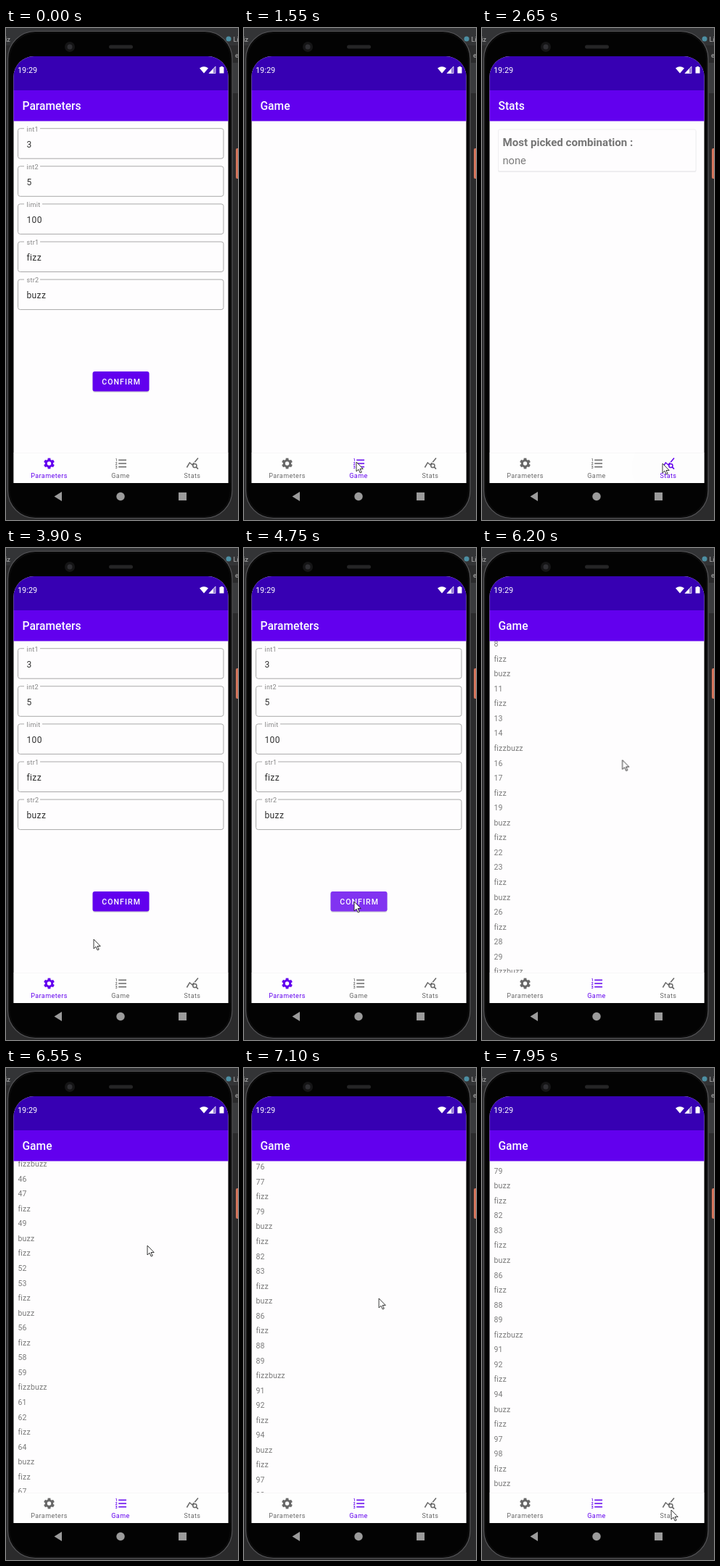
These frames come from a looping animation (320x679 px, 8000 ms). An HTML page:

```html
<!DOCTYPE html>
<html lang="en">
<head>
<meta charset="utf-8">
<title>FizzBuzz app demo</title>
<style>
  html, body { margin: 0; width: 100%; height: 100%; overflow: hidden; background: #2b2b2c; }
  svg { display: block; width: 100%; height: 100%; font-family: Roboto, sans-serif; }
  .title { font-size: 15.6px; font-weight: 500; fill: #fff; }
  .label { font-size: 9px; letter-spacing: .3px; fill: #858585; }
  .value { font-size: 12px; letter-spacing: .38px; fill: #303030; }
  .row { font-size: 10.5px; letter-spacing: .19px; fill: #7a7a7a; }
  .tab { color: #686868; }
  .tab text { font-size: 9px; letter-spacing: .42px; text-anchor: middle; fill: currentColor; }
  .line { fill: none; stroke: currentColor; }
</style>
</head>
<body>
<svg viewBox="0 0 320 679">
  <defs>
    <clipPath id="screen"><path d="M10.5 628V67A28 28 0 0 1 38.5 39H278.5A28 28 0 0 1 306.5 67V628Z"/></clipPath>
    <clipPath id="content"><rect x="10.5" y="128" width="296" height="458"/></clipPath>
    <clipPath id="bar"><rect x="10.5" y="586" width="296" height="42"/></clipPath>
    <clipPath id="pill"><rect x="119.5" y="474" width="78" height="27.5" rx="3"/></clipPath>
  </defs>

  <!-- desktop behind the phone -->
  <rect width="320" height="679" fill="#2b2b2c"/>
  <rect width="320" height="24" fill="#333436"/>
  <rect x="313" y="48" width="7" height="42" fill="#3a3b3d"/>
  <g font-size="9.500" fill="#b4b4b4">
    <text x="-1" y="19">iz</text><text x="313.500" y="19">Li</text><text x="316" y="41">e</text>
  </g>
  <circle cx="307" cy="15" r="3.5" fill="#4d8fa3"/>
  <rect x="317" y="166" width="6" height="42" rx="2" fill="#d5755c"/>

  <!-- phone body -->
  <rect x="2.500" y="4.500" width="309.500" height="672" rx="38" fill="#0b0b0b" stroke="#555558" stroke-width="1.200"/>
  <rect x="5.500" y="7.500" width="303.500" height="666" rx="35" fill="#030303"/>
  <circle cx="88" cy="26" r="7" fill="#151516"/><circle cx="88" cy="26" r="3.5" fill="#303034"/>
  <rect x="142" y="23.5" width="33" height="5" rx="2.5" fill="#252526"/>

  <g clip-path="url(#screen)">
    <rect x="10" y="39" width="297" height="589" fill="#fefdfe"/>
    <g id="pages" clip-path="url(#content)"></g>
    <rect x="10" y="39" width="297" height="47" fill="#3700b3"/>
    <rect x="10" y="86" width="297" height="42.5" fill="#6200ee"/>
    <g id="titles"></g>
    <g fill="#fff">
      <text x="16" y="62" font-size="10.900">19:29</text>
      <path d="M267 55.5Q273 51 279 55.5L273 62.5Z"/>
      <path d="M289 53V62.500H280Z" fill-opacity=".45"/><path d="M286 56.200V62.500H280Z"/>
      <path d="M289 53V62.500H280Z" fill="none" stroke="#fff" stroke-width=".7"/>
      <path d="M294.500 54H296V53H299V54H300.500V62.500H294.500Z"/>
    </g>
    <g clip-path="url(#bar)">
      <rect x="10" y="586" width="297" height="42" fill="#fefefe"/>
      <path d="M10 586H307" stroke="#f1f0f2"/>
      <g id="ripples"></g>
      <g id="tabs"></g>
    </g>
  </g>

  <g fill="#9b9b9b">
    <path d="M66.500 646.500L77 640V653Z"/><circle cx="158" cy="646.500" r="5.700"/>
    <rect x="238" y="641" width="11" height="11"/>
  </g>
  <path id="cursor" d="M0 0V13L3 10.200L5.200 15L7.200 14.100L5 9.500H9.200Z" fill="#fff" stroke="#222" stroke-width=".9"/>
</svg>

<script>
const LOOP = 8000;
const $ = id => document.getElementById(id);

// steps: [ms, value, easing towards the next step]
function track(el, prop, steps) {
  const first = steps[0], last = steps[steps.length - 1];
  const all = [...steps];
  if (first[0] > 0) all.unshift([0, first[1]]);
  if (last[0] < LOOP) all.push([LOOP, last[1]]);
  const frames = all.map(([ms, value, easing = 'linear']) =>
    ({ offset: ms / LOOP, [prop]: value, easing }));
  el.animate(frames, { duration: LOOP, iterations: Infinity });
}

const hold = (el, prop, steps) =>
  track(el, prop, steps.map(([ms, value]) => [ms, value, 'step-end']));

// Pages
const fields = [['int1', '3', 22], ['int2', '5', 22], ['limit', '100', 25], ['str1', 'fizz', 22], ['str2', 'buzz', 22]];
const fieldMarkup = ([label, value, gap], i) => `
  <g transform="translate(0 ${i * 52.1})">
    <rect x="16.500" y="138.700" width="283.500" height="41.500" rx="3" fill="none" stroke="#a9a9a9"/>
    <rect x="25" y="137" width="${gap}" height="4" fill="#fefdfe"/>
    <text class="label" x="28.500" y="142.800">${label}</text>
    <text class="value" x="28.500" y="164.500">${value}</text>
  </g>`;

const word = n => (n % 3 ? '' : 'fizz') + (n % 5 ? '' : 'buzz') || n;
const ROW = 20.56;
const rows = Array.from({ length: 100 }, (_, i) =>
  `<text class="row" x="16.500" y="${(145.6 + i * ROW).toFixed(2)}">${word(i + 1)}</text>`).join('');

$('pages').innerHTML = `
  <g id="list"><g id="rows">${rows}</g></g>
  <g id="stats">
    <rect x="22" y="141" width="273.500" height="58" rx="2" fill="#ececee"/>
    <rect x="22.500" y="140" width="272.500" height="57.500" rx="2" fill="#fefdfe" stroke="#f0eff1"/>
    <text x="28.500" y="162.700" font-size="15.100" font-weight="700" fill="#757575">Most picked combination :</text>
    <text x="28.500" y="187.700" font-size="14.700" fill="#7c7c7c">none</text>
  </g>
  <g id="params">
    ${fields.map(fieldMarkup).join('')}
    <rect x="119.500" y="475" width="78" height="28" rx="3" fill="#000" opacity=".14"/>
    <rect x="119.500" y="474" width="78" height="27.500" rx="3" fill="#6200ee"/>
    <circle id="press" cx="158" cy="488" r="0" fill="#fff" opacity="0" clip-path="url(#pill)"/>
    <text x="132.300" y="491.800" font-size="10.500" font-weight="500" letter-spacing="1.080" fill="#fff">CONFIRM</text>
  </g>`;

// Navigation
const teeth = [0, 60, 120, 180, 240, 300].map(a =>
  `<path class="line" stroke-width="3.800" d="M0 -4.500V-7.400" transform="rotate(${a})"/>`).join('');
const icons = [
  `<circle class="line" r="4.200" stroke-width="3"/>${teeth}`,
  [-4.7, 0, 4.7].map((y, i) => `<path class="line" stroke-width="1.500" d="M-2.800 ${y}H8"/>
    <text x="-5.600" y="${y + 1.8}" style="font-size:5px;font-weight:700">${i + 1}</text>`).join(''),
  `<path class="line" stroke-width="1.500" d="M-7.600 5.500L-3.700 -1.200L0 2L2.200 -1M3.200 -1.800L8 -7.500"/>
   <circle class="line" cx="3.400" cy="3" r="2.600" stroke-width="1.500"/>
   <path class="line" stroke-width="1.600" d="M5.300 4.900L8 7.600"/>`
];
const names = ['Parameters', 'Game', 'Stats'];
const centers = [59.5, 158, 257];
$('tabs').innerHTML = names.map((name, i) => `
  <g class="tab"><g transform="translate(${centers[i]} 601)">${icons[i]}</g>
  <text x="${centers[i]}" y="620.800">${name}</text></g>`).join('');
$('titles').innerHTML = names.map(name => `<text class="title" x="22.500" y="113.300">${name}</text>`).join('');

// Tab changes: [release time, tab index]
const visits = [[0, 0], [1150, 1], [2330, 2], [3560, 0], [5500, 1]];
names.forEach((_, i) => {
  hold($('titles').children[i], 'opacity', visits.map(([ms, tab]) => [ms, tab === i ? 1 : 0]));
  hold($('tabs').children[i], 'color', visits.map(([ms, tab]) => [ms, tab === i ? '#6200ee' : '#686868']));
});

function ripple(el, start, radius, strength) {
  track(el, 'r', [[start, '8px', 'ease-out'], [start + 200, radius + 'px'], [start + 350, radius * 1.15 + 'px']]);
  track(el, 'opacity', [[start, 0], [start + 40, strength], [start + 230, strength], [start + 430, 0]]);
}
for (const [ms, tab] of visits.slice(1)) {
  $('ripples').insertAdjacentHTML('beforeend', `<circle cx="${centers[tab] - 1}" cy="607" r="0" opacity="0"/>`);
  ripple($('ripples').lastElementChild, ms - 100, 43, .155);
}
ripple($('press'), 4580, 42, .2);

// Cross-fades between pages
const FADE = 250;
const fade = (id, start, ...changes) => track($(id), 'opacity',
  [[0, start], ...changes.flatMap(([ms, to]) => [[ms, 1 - to], [ms + FADE, to]])]);
fade('params', 1, [1150, 0], [3560, 1], [5500, 0]);
fade('stats', 0, [2330, 1], [3560, 0]);
fade('list', 0, [5500, 1]);

// Drag, then a decelerating fling to the end of the list
const DECELERATE = 'cubic-bezier(.333,.667,.667,1)';
const scroll = y => `translateY(${-y}px)`;
track($('rows'), 'transform', [
  [6080, scroll(0), 'ease-in'], [6250, scroll(269), DECELERATE], [7321, scroll(78 * ROW)]
]);

const EASE = 'ease-in-out';
track($('cursor'), 'transform', [
  [200, 285, 654], [850, 160, 607], [1150, 155, 599], [1800, 155, 599],
  [2180, 249, 603], [2400, 249, 601], [2750, 249, 601], [3350, 62, 606],
  [3600, 62, 604], [3900, 121, 540], [4350, 150, 486], [4750, 152, 488],
  [5150, 155, 600], [5400, 156, 606], [5960, 157, 604], [6080, 187, 520],
  [6250, 195, 245], [6900, 195, 245], [7550, 150, 611], [7680, 150, 609],
  [7950, 261, 610]
].map(([ms, x, y]) => [ms, `translate(${x}px,${y}px)`, EASE]));
hold($('cursor'), 'opacity', [[0, 0], [200, 1]]);
</script>
</body>
</html>
```
